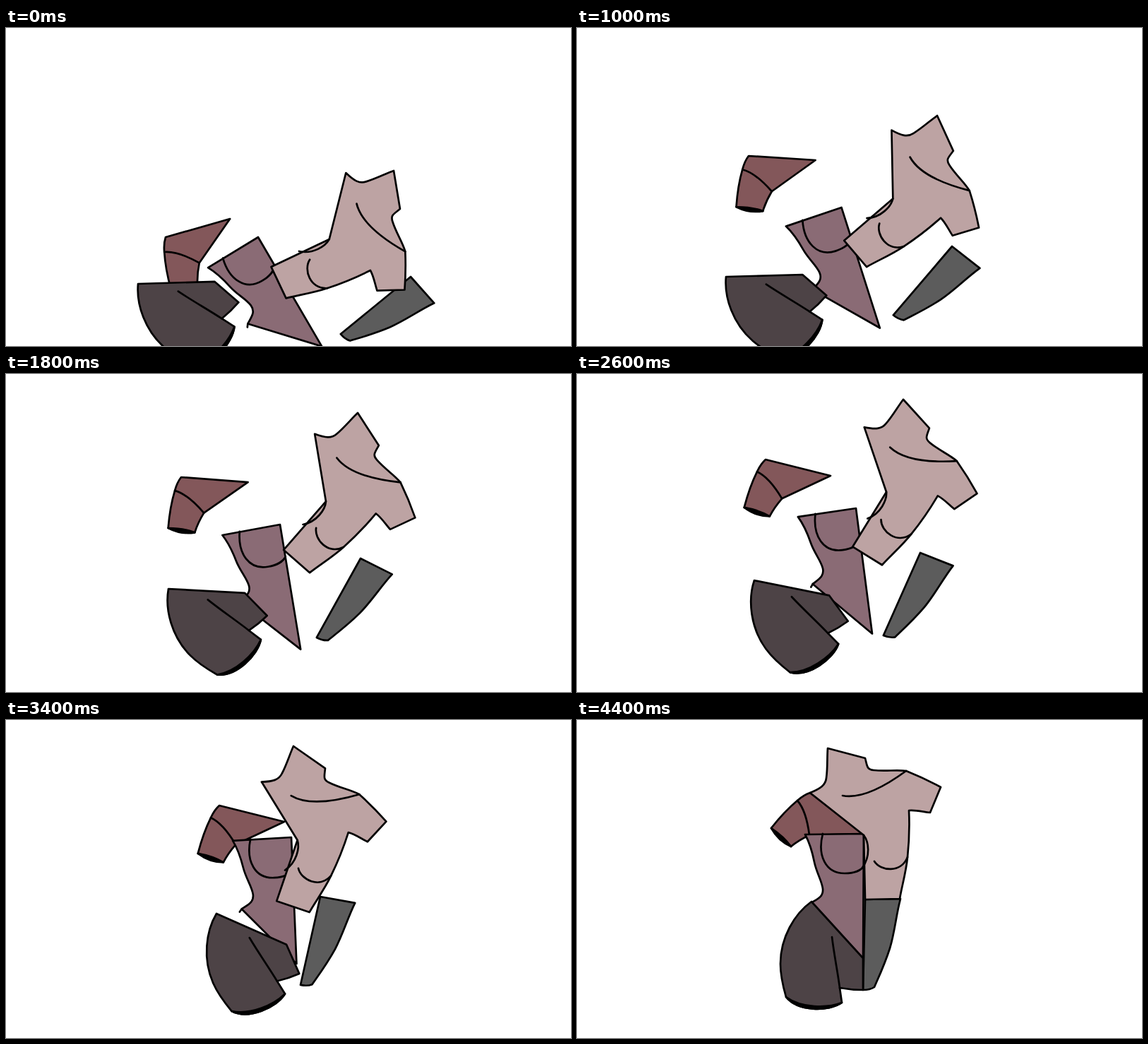
An HTML page for the animation above (5 s loop, 800 by 450 pixels).

```html
<!DOCTYPE html>
<html lang="en">
<head>
<meta charset="utf-8">
<title>Torso assembling</title>
<style>
  html, body { margin: 0; width: 100%; height: 100%; overflow: hidden; background: #fff; }
  svg { display: block; width: 100vw; height: 100vh; }
  .line { fill: none; }
</style>
</head>
<body>
<svg id="stage" viewBox="0 0 800 450" stroke="#000" stroke-width="2.7" stroke-linejoin="round" stroke-linecap="round"></svg>
<script>
const STEP = 100, LOOP = 5000;
const LIFT_STEPS = 6, LAST_STEP = 44, BEAT = 8, FIRST_BEAT = 10;

// Shapes are drawn assembled. Each piece first lifts without turning,
// then swings through its poses (anchor x, y, degrees) into place.
const pieces = [
  {
    fill: '#5c5c5c', anchor: [408, 254], lift: [-9, -14],
    outline: 'M408,254 L458,253 C452,275 450,300 443,323 C436,345 428,362 421,378 Q415,382 405,382 Z',
    poses: [[564, 338, 49.4], [531, 309, 39.2], [502, 261, 27.7], [486, 253, 22.7], [445, 250, 11.3]]
  },
  {
    fill: '#83575a', anchor: [330, 103], lift: [-1, -75],
    outline: 'M330,103 L405,161 L329,163 Q314,170 303,179 L275,153 C286,139 300,124 312,114 Q321,106 330,103 Z',
    lines: 'M312,114 C320,123 326,139 329,163',
    shade: 'M275,153 Q285,171 303,179 Q293,165 275,153 Z',
    poses: [[225, 221, -53.6], [243, 181, -34.1], [248, 146, -33.4], [267, 121, -23.7], [302, 121, -23.7]]
  },
  {
    fill: '#8a6b75', anchor: [406, 161], lift: [0, -28.5],
    outline: 'M323,162 L406,161 L405,340 L331,259 C341,253 349,250 348,239 C347,228 339,216 336,201 C333,186 329,173 323,162 Z',
    lines: 'M348,161 C340,192 352,217 379,217 C392,217 402,213 406,207 M331,259 L328,263',
    poses: [[357, 267.5, -30.6], [374.5, 254, -18], [388, 213, -9.7], [395, 190, -7.7], [404, 166, -2.7]]
  },
  {
    fill: '#bda3a3', anchor: [355, 40], lift: [0, -39],
    outline: 'M355,40 L408,54 C411,65 410,70 420,71 C437,73 452,70 466,72 Q491,82 515,95 L500,131 ' +
      'C490,130 480,127 470,128 C471,150 470,175 468,194 C466,215 460,235 457,253 L408,254 L406,163 ' +
      'L330,103 C345,97 352,92 353,82 C355,68 354,52 355,40 Z',
    lines: 'M376,107 C402,112 436,94 466,72 M421,200 C430,214 459,217 468,194 M406,163 C413,172 416,193 404,209',
    poses: [[549, 163, 65.8], [510, 124, 50.6], [498, 55, 42.3], [462, 36, 32.9], [407, 37, 20.1]]
  },
  {
    fill: '#4d4346', anchor: [332, 257], lift: [-3, -1.5],
    outline: 'M332,257 L405,337 L405,382 Q388,382 372,379 L375,400 C356,413 313,413 296,392 ' +
      'C292,378 288,362 288,345 C288,308 308,274 332,257 Z',
    lines: 'M361,307 C364,332 369,356 372,379',
    shade: 'M375,400 C356,413 313,413 296,392 C318,408 354,408 375,400 Z',
    poses: [[184, 360.5, -49.3], [211, 352, -49.2], [230, 304, -44.5], [251, 292, -36.2], [298, 274, -23.8]]
  }
];

const stage = document.getElementById('stage');

function add(parent, tag, attributes) {
  const node = document.createElementNS('http://www.w3.org/2000/svg', tag);
  for (const name in attributes) node.setAttribute(name, attributes[name]);
  return parent.appendChild(node);
}

for (const piece of pieces) {
  piece.group = add(stage, 'g', {});
  add(piece.group, 'path', { d: piece.outline, fill: piece.fill });
  if (piece.lines) add(piece.group, 'path', { d: piece.lines, class: 'line' });
  if (piece.shade) add(piece.group, 'path', { d: piece.shade });
  piece.poses.push([...piece.anchor, 0]);
}

const lerp = (a, b, t) => a + (b - a) * t;

// Beats are evenly spaced, apart from a short first and a long last one.
function beatStart(index, last) {
  if (index === 0) return LIFT_STEPS;
  return index === last ? LAST_STEP : FIRST_BEAT + BEAT * (index - 1);
}

function poseAt({ poses, lift }, step) {
  const [x, y, angle] = poses[0];
  if (step < LIFT_STEPS) {
    const left = 1 - step / LIFT_STEPS;
    return [x - lift[0] * left, y - lift[1] * left, angle];
  }
  const last = poses.length - 1;
  let beat = 0;
  while (beat < last - 1 && step >= beatStart(beat + 1, last)) beat++;
  const begin = beatStart(beat, last);
  const t = (step - begin) / (beatStart(beat + 1, last) - begin);
  const from = poses[beat], to = poses[beat + 1];
  return [lerp(from[0], to[0], t), lerp(from[1], to[1], t), lerp(from[2], to[2], t ** 1.5)];
}

function render(time) {
  const step = Math.min(LAST_STEP, Math.floor((time % LOOP) / STEP));
  for (const piece of pieces) {
    const [x, y, angle] = poseAt(piece, step);
    const [ax, ay] = piece.anchor;
    piece.group.setAttribute('transform', `translate(${x} ${y}) rotate(${angle}) translate(${-ax} ${-ay})`);
  }
}

const start = performance.now();
function tick() {
  render(performance.now() - start);
  requestAnimationFrame(tick);
}
tick();
</script>
</body>
</html>
```
